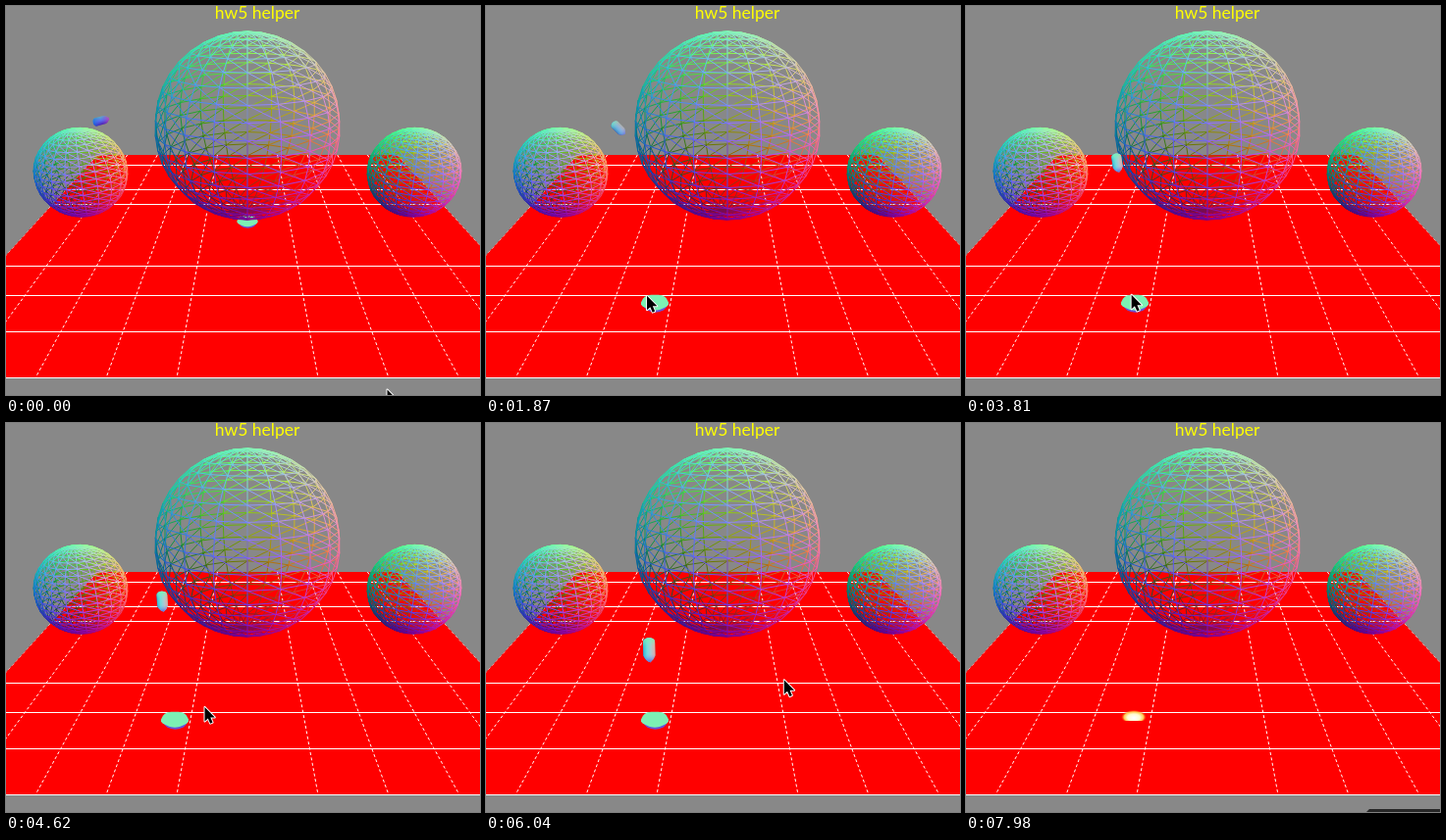
An HTML page with a canvas that plays this animation: 483x397 px, repeating every 8 s.

```html
<!DOCTYPE html>
<html lang="en">
<head>
<meta charset="utf-8">
<title>hw5 helper</title>
<style>
  html, body { margin: 0; width: 483px; height: 397px; overflow: hidden; background: #888; }
  canvas { display: block; }
  h1 {
    position: absolute; left: 156px; top: -4px; width: 200px; margin: 0;
    font: 400 17.5px/22px Lato, "Open Sans", sans-serif;
    color: #ff0; text-align: center; white-space: nowrap;
  }
</style>
</head>
<body>
<canvas id="stage" width="483" height="397"></canvas>
<h1>hw5 helper</h1>
<script>
const W = 483, H = 397, LOOP = 8000, HIT = 7665, CLICK = 800;
const CX = 246, CY = 198, FOCAL = 479, HORIZON = -16;
const PITCH = Math.atan((CY - HORIZON) / FOCAL);
const ctx = document.getElementById('stage').getContext('2d');

function layer(draw) {
  const c = document.createElement('canvas');
  c.width = W;
  c.height = H;
  draw(c.getContext('2d'));
  return c;
}

function poly(g, points) {
  g.beginPath();
  points.forEach(([x, y]) => g.lineTo(x, y));
  g.closePath();
}

// Red floor: ten by ten cells in perspective
const NEAR = 379.5, FAR = 152.2, CELL = 72;
const floorX = (k, y) => CX + k * CELL * (y - HORIZON) / (NEAR - HORIZON);
function floorY(row) {
  const near = 1 / (NEAR - HORIZON), far = 1 / (FAR - HORIZON);
  return HORIZON + 1 / (near + (far - near) * row / 10);
}

const floor = layer(g => {
  g.fillStyle = '#888';
  g.fillRect(0, 0, W, H);
  const top = 152, bottom = 380;
  poly(g, [[floorX(-5, top), top], [floorX(5, top), top],
    [floorX(5, bottom), bottom], [floorX(-5, bottom), bottom]]);
  g.fillStyle = '#f00';
  g.fill();
  g.save();
  g.clip();
  g.fillStyle = g.strokeStyle = '#fff';
  for (const row of [0, 1, 2, 3, 6, 7, 9]) g.fillRect(0, Math.floor(floorY(row)), W, 1);
  g.setLineDash([3, 2.5]);
  for (let k = -5; k <= 5; k++) {
    if (k === 0) continue;
    g.beginPath();
    g.moveTo(floorX(k, top), top);
    g.lineTo(floorX(k, bottom), bottom);
    g.stroke();
  }
  g.restore();
});

// Wire sphere coloured by its view-space normals
function wireSphere(g, cx, cy, radius, n = 20) {
  const sp = Math.sin(PITCH), cp = Math.cos(PITCH);
  const vertex = (row, col) => {
    const th = row / n * Math.PI, ph = col / n * 2 * Math.PI;
    const x = -Math.cos(ph) * Math.sin(th), y = Math.cos(th), z = Math.sin(ph) * Math.sin(th);
    const normal = [x, y * cp - z * sp, y * sp + z * cp];
    const depth = 1 - radius * normal[2];
    return {
      normal,
      x: CX + FOCAL * (cx + radius * normal[0]) / depth,
      y: CY - FOCAL * (cy + radius * normal[1]) / depth
    };
  };
  const edges = [];
  for (let r = 0; r < n; r++) {
    for (let c = 0; c < n; c++) {
      const a = vertex(r, c);
      for (const b of [vertex(r, c + 1), vertex(r + 1, c), vertex(r + 1, c + 1)]) {
        const mid = a.normal.map((v, i) => (v + b.normal[i]) / 2);
        edges.push({ a, b, mid });
      }
    }
  }
  edges.sort((p, q) => p.mid[2] - q.mid[2]);
  for (const { a, b, mid } of edges) {
    g.strokeStyle = `rgb(${mid.map(v => Math.round(127.5 + 127.5 * v)).join()})`;
    g.beginPath();
    g.moveTo(a.x, a.y);
    g.lineTo(b.x, b.y);
    g.stroke();
  }
}

const spheres = layer(g => {
  wireSphere(g, -0.3518, 0.0585, 0.0942);
  wireSphere(g, 0.3518, 0.0585, 0.0942);
  wireSphere(g, 0, 0.1525, 0.1945);
});

// The pill turns toward the disc and comes closer in perspective
function pillPose(t) {
  const p = t / HIT, s = Math.max(0, (t - 900) / (HIT - 900));
  return {
    x: 97 + 75 * p * 1.45 / (p + 0.45),
    y: 117 + 34 * s + 154 * s * s,
    deg: 89 - 104 * Math.exp(-((p / 0.27) ** 1.6)),
    len: 17 + 15 * s ** 2.3,
    wid: 8.5 + 5.5 * s ** 1.5
  };
}

const cursorStops = [ // time, x, y
  [90, 388, 391], [CLICK, 161, 296], [4170, 169, 294], [5250, 248, 283],
  [5860, 301, 262], [6740, 312, 261], [7400, 478, 398]
];

function cursorPos(t) {
  const i = Math.max(1, cursorStops.findIndex(s => s[0] > t));
  const [t0, x0, y0] = cursorStops[i - 1], [t1, x1, y1] = cursorStops[i];
  const u = Math.max(0, (t - t0) / (t1 - t0));
  return [x0 + (x1 - x0) * u, y0 + (y1 - y0) * u];
}

function gradient(x0, y0, x1, y1, colors) {
  const g = ctx.createLinearGradient(x0, y0, x1, y1);
  colors.forEach((c, i) => g.addColorStop(i / (colors.length - 1), c));
  return g;
}

function drawDisc(x, y, scale) {
  ctx.save();
  ctx.translate(x, y);
  ctx.scale(scale, scale);
  ctx.fillStyle = '#6a50d8';
  ctx.beginPath();
  ctx.ellipse(0.5, 1.5, 12, 8.2, 0, 0, 7);
  ctx.fill();
  ctx.beginPath();
  for (let i = 0; i < 24; i++) {
    const a = i / 24 * 2 * Math.PI, r = 1 + 0.04 * Math.sin(5 * a);
    ctx.lineTo(14 * r * Math.cos(a), 8 * r * Math.sin(a) - 0.5);
  }
  ctx.fillStyle = '#7cf0b4';
  ctx.fill();
  ctx.restore();
}

function drawPill(t) {
  const { x, y, deg, len, wid } = pillPose(t);
  const l = len / 2, w = wid / 2;
  const upright = Math.min(1, Math.max(0, (deg - 15) / 45));
  const shade = (alpha, ...g) => {
    ctx.globalAlpha = alpha;
    ctx.fillStyle = gradient(...g);
    ctx.fill();
  };
  ctx.save();
  ctx.translate(x, y);
  ctx.rotate(deg * Math.PI / 180);
  ctx.beginPath();
  ctx.moveTo(-l + w * 0.7, -w);
  ctx.lineTo(l * 0.45, -w);
  ctx.quadraticCurveTo(l * 0.75, -w * 0.8, l, -w * 0.15);
  ctx.quadraticCurveTo(l * 0.95, w * 0.5, l * 0.45, w);
  ctx.lineTo(-l + w * 0.7, w);
  ctx.bezierCurveTo(-l - w * 0.25, w, -l - w * 0.25, -w, -l + w * 0.7, -w);
  // Lying: teal above, violet below. Upright: pink right, cyan left.
  shade(1, 0, -w, 0, w, ['#58c0c0', '#5a70f0', '#4c10a0']);
  shade(1 - upright, -l, 0, l, 0, ['rgba(0,110,220,.7)', 'rgba(90,80,240,.15)', 'rgba(225,60,160,.75)']);
  shade(upright, 0, -w, 0, w, ['#eca49c', '#b4c8d0', '#70dce0', '#28b8d0']);
  shade(upright, -l, 0, l, 0,
    ['rgba(120,245,180,.9)', 'rgba(130,235,190,.15)', 'rgba(130,180,240,.1)', 'rgba(80,80,220,.85)']);
  ctx.restore();
}

function drawFire(t) {
  ctx.save();
  ctx.beginPath();
  ctx.rect(158, 288, 28, 16);
  ctx.clip();
  ctx.translate(171, 300);
  ctx.scale(1, 0.55);
  const g = ctx.createRadialGradient(0, 2, 1, 0, 0, 12.5 + 0.5 * Math.sin(t / 45));
  g.addColorStop(0, '#fff');
  g.addColorStop(0.45, '#fffbd0');
  g.addColorStop(0.75, '#ffc850');
  g.addColorStop(1, 'rgba(255,60,0,0)');
  ctx.fillStyle = g;
  ctx.fillRect(-14, -14, 28, 28);
  ctx.restore();
}

function drawCursor(t) {
  ctx.save();
  ctx.translate(...cursorPos(t));
  poly(ctx, [[0.5, 0.5], [0.5, 15], [3.8, 12], [6.2, 17.3], [8.6, 16.2], [6.3, 11], [10.8, 11]]);
  ctx.lineJoin = 'round';
  ctx.strokeStyle = '#fff';
  ctx.lineWidth = 2;
  ctx.stroke();
  ctx.fillStyle = '#000';
  ctx.fill();
  ctx.restore();
}

function drawBar(left) {
  poly(ctx, [[left, H], [left + 3, H - 3], [W, H - 3], [W, H]]);
  ctx.fillStyle = '#262626';
  ctx.fill();
}

function frame(t) {
  const hit = t >= HIT;
  ctx.drawImage(floor, 0, 0);
  if (t < CLICK) drawDisc(246, 219.5, 0.75);
  else if (!hit) drawDisc(172, 303, 1);
  ctx.drawImage(spheres, 0, 0);
  if (hit) drawFire(t);
  else drawPill(t);
  if (t < 7400) drawCursor(t);
  if (t >= 7600) drawBar(t < 7890 ? 475 : 408);
}

const start = performance.now();
function tick() {
  frame((performance.now() - start) % LOOP);
  requestAnimationFrame(tick);
}
tick();
</script>
</body>
</html>
```
